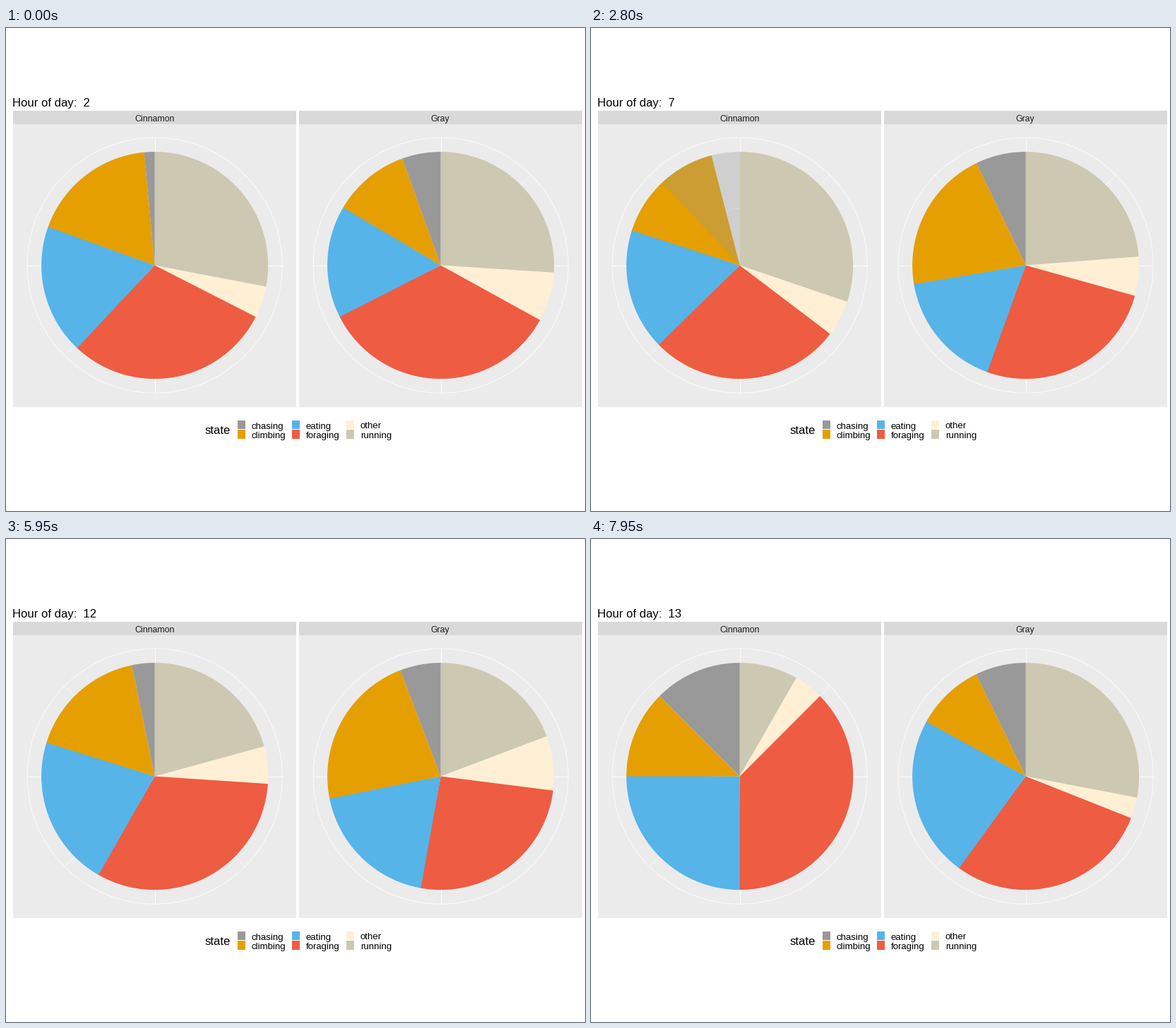
Write a matplotlib script that moves like this. It is 820 px wide and 683 px high and loops after 8000 ms.

```python
import numpy as np
import matplotlib.pyplot as plt
from matplotlib.animation import FuncAnimation
from matplotlib.patches import Circle, Polygon, Rectangle

W, H, DPI = 820, 683, 64
PX = 72 / DPI
CY, R_PIE = 335.6, 160.5
R_RING = R_PIE * 9 / 8
PANEL_W, PANEL_STEP = 401.5, 405
STEPS, CYCLE = 16, 32

COLORS = {
    "running": "#CDC8B1", "other": "#FFEFD5", "foraging": "#EE5C42",
    "eating": "#56B4E9", "climbing": "#E69F00", "chasing": "#999999",
}

# Hour: where each slice ends, in percent clockwise; chasing takes the rest.
SHARES = {
    2: [(28, 32.5, 62, 80.5, 98.5), (26, 33, 67.5, 83.5, 94.5)],
    5: [(24, 28, 60, 68, 88), (22.3, 28, 57.3, 73, 92.5)],
    7: [(33.3, 39, 64, 86, 100), (24.5, 30, 54.6, 72, 93)],
    9: [(20, 23.6, 54.5, 76.3, 98.2), (19, 27.3, 52.6, 69.5, 94.8)],
    12: [(21.5, 28.5, 62, 83.3, 95.3), (19.5, 26.7, 53, 74.2, 93.6)],
    13: [(8.3, 12.5, 50, 75, 87.5), (28, 31, 60, 83, 92.8)],
}
HOURS = list(SHARES)

fig = plt.figure(figsize=(W / DPI, H / DPI), dpi=DPI, facecolor="white")
ax = fig.add_axes([0, 0, 1, 1])
ax.set_xlim(0, W)
ax.set_ylim(H, 0)
ax.axis("off")


def box(x, y, w, h, color):
    ax.add_patch(Rectangle((x, y), w, h, fc=color, lw=0))


def label(x, y, text, size, color="black", ha="left"):
    return ax.text(x, y, text, fontsize=size * PX, color=color,
                   family="Liberation Sans", ha=ha, va="baseline")


def arc(cx, r, turn):
    a = 2 * np.pi * np.asarray(turn)
    return cx + r * np.sin(a), CY - r * np.cos(a)


def sector(cx, start, end):
    x, y = arc(cx, R_PIE, np.linspace(start, end, 100))
    return np.column_stack([np.append(cx, x), np.append(CY, y)])


def ease(t):
    return 4 * t ** 3 if t < 0.5 else 1 - 4 * (1 - t) ** 3


class Pie:
    def __init__(self, index, name):
        x0 = 9.5 + index * PANEL_STEP
        self.cx = cx = x0 + PANEL_W / 2 + 0.4
        self.ends = [np.array((0, *SHARES[h][index])) / 100 for h in HOURS]
        box(x0, 117, PANEL_W, 18.5, "#D9D9D9")
        box(x0, 135.5, PANEL_W, 400.5, "#EBEBEB")
        label(cx - 0.5, 132, name, 12.2, "#1A1A1A", "center")
        for r in (R_PIE / 2, R_RING):
            ax.add_patch(Circle((cx, CY), r, fill=False, ec="white", lw=0.75 * PX))
        for k in range(8):
            x, y = arc(cx, R_RING, k / 8)
            ax.plot([cx, x], [CY, y], color="white", zorder=1,
                    lw=(0.45 if k % 2 else 0.9) * PX)
        self.parts = [ax.add_patch(Polygon([(cx, CY)] * 3, fc=c, lw=0, zorder=3))
                      for c in COLORS.values()]

    def update(self, s, e):
        old, new = self.ends[s], self.ends[s + 1]
        now = old + (new - old) * e
        last, alpha = now[-1], 1
        # A slice that enters or leaves fades in place instead of growing.
        if old[-1] == 1:
            last, alpha = new[-1], e
        elif new[-1] == 1:
            last, alpha = old[-1], 1 - e
        for part, a, b in zip(self.parts, now, now[1:]):
            # Slight overlap hides the seam under the next slice.
            part.set_xy(sector(self.cx, a, min(b + 0.002, now[-1])))
        self.parts[-1].set_xy(sector(self.cx, last, 1))
        self.parts[-1].set_alpha(alpha)


pies = [Pie(i, name) for i, name in enumerate(["Cinnamon", "Gray"])]
title = label(9, 110.5, "", 16.6)

label(281.5, 574.5, "state", 16.7)
for i, name in enumerate(sorted(COLORS)):
    x, y = 328 + 77 * (i // 2), 554.5 + 13.6 * (i % 2)
    box(x, y, 11.3, 12.5, COLORS[name])
    label(x + 19.7, y + 12, name, 13.2)


def draw(i):
    s, r = divmod(i, CYCLE)
    t = max(0, r - STEPS + 1) / STEPS
    for pie in pies:
        pie.update(s, ease(t))
    title.set_text(f"Hour of day:  {HOURS[s + (t >= 0.5)]}")
    return [title] + [p for pie in pies for p in pie.parts]


anim = FuncAnimation(fig, draw, frames=CYCLE * (len(HOURS) - 1), interval=50,
                     repeat=True, repeat_delay=0, init_func=lambda: draw(0))
plt.show()
```
